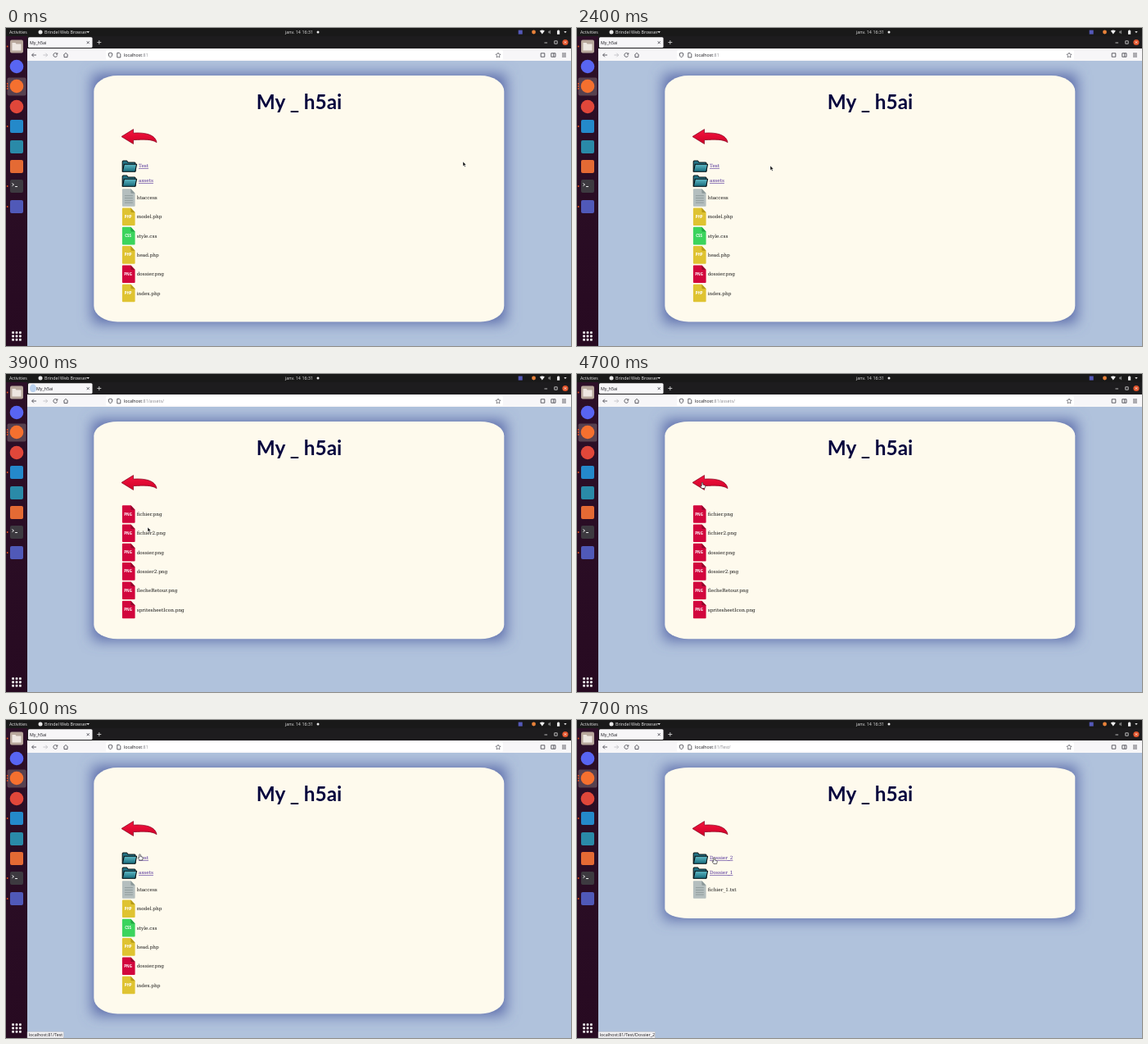
Recreate the animation shown at these times as an HTML page. Size 690x388 px, loop 8 s.

```html
<!DOCTYPE html>
<html lang="fr">
<head>
<meta charset="utf-8">
<title>My_h5ai</title>
<style>
  html, body { margin: 0; width: 100%; height: 100%; overflow: hidden; background: #b0c2dc; }
  svg { display: block; width: 690px; height: 388px; }
  .ui { font: 5.3px "Open Sans", sans-serif; fill: #15141a; }
  .bar { fill: #e8e8e8; }
  .dim { fill: #85858c; }
  .row { font: 5.74px "DejaVu Serif", serif; fill: #111; }
  .link { text-decoration: underline; }
  .tag { font: bold 4.4px "Open Sans", sans-serif; fill: #fff; text-anchor: middle; }
  .line { fill: none; stroke: #3c3b44; stroke-width: .8; }
  .pale { fill: none; stroke: #ddd; stroke-width: .8; }
</style>
</head>
<body>
<svg viewBox="0 0 690 388">
  <defs>
    <filter id="blur" x="-20%" y="-30%" width="140%" height="160%"><feGaussianBlur stdDeviation="8.5"/></filter>
    <linearGradient id="dock" x2="0" y2="1">
      <stop offset="0" stop-color="#2d1028"/><stop offset="1" stop-color="#270a21"/>
    </linearGradient>
    <linearGradient id="teal" x2="0" y2="1">
      <stop offset="0" stop-color="#62bcc8"/><stop offset="1" stop-color="#176b7c"/>
    </linearGradient>
    <linearGradient id="red" x2="0" y2="1">
      <stop offset="0" stop-color="#f5153f"/><stop offset="1" stop-color="#cf0028"/>
    </linearGradient>
    <g id="folder" stroke="#0b1519" stroke-width="1.1" stroke-linejoin="round">
      <path d="M1.2 13.8V2q0-1 1-1H6.5l1.6 2H16q1 0 1 1V13.8Z" fill="#237284"/>
      <path d="M1.3 14.2 3.4 5.2H18.6L16.8 14.2Z" fill="url(#teal)"/>
    </g>
  </defs>

  <rect width="690" height="388" fill="#b0c2dc"/>
  <rect id="shade" x="106" y="57" width="504" fill="#5465a6" filter="url(#blur)"/>
  <rect id="card" x="107.3" y="58" width="501" rx="29" fill="#fefaed"/>
  <text x="358" y="98.5" text-anchor="middle" fill="#05043d" style="font:bold 24.3px Lato,sans-serif">My _ h5ai</text>
  <path d="M141 132.5 155.5 123.6V128.2C171 127.2 182.5 130.5 184 139.6 178 135.6 169 135.8 155.5 136.6V141.4Z" fill="url(#red)" stroke="#8d0a25" stroke-width=".8" stroke-linejoin="round"/>
  <g id="rows"></g>

  <rect x="26" y="10" width="664" height="15" fill="#1d1c1e"/>
  <rect x="26" y="25" width="664" height="15" fill="#f7f6f8"/>
  <rect x="27" y="11.3" width="78.5" height="12.7" rx="1.5" fill="#f7f6f8"/>
  <rect x="122" y="27" width="485" height="11.5" rx="1.5" fill="#fff"/>
  <path class="line" d="M98.7 16.2l3 3m0-3l-3 3"/>
  <path class="pale" d="M113.8 15v5m-2.5-2.5h5"/>
  <path class="pale" d="M657.5 18h3.6M669.8 15.8h3.4v3.4h-3.4Z"/>
  <circle cx="683" cy="17.5" r="3.6" fill="#e2552c"/>
  <path d="M681.7 16.2l2.6 2.6m0-2.6l-2.6 2.6" stroke="#fff" stroke-width=".7"/>

  <path class="line" d="M37 33H31.7M33.9 30.7 31.6 33l2.3 2.3M62.3 31.6A2.4 2.4 0 1 0 62.6 33.6M62.8 30.3v1.8h-1.8M70.3 33 73 30.4 75.7 33M71 32.6v3h4v-3"/>
  <path class="line" style="stroke:#b9b9be" d="M45.4 33h5.2M48.4 30.7 50.7 33l-2.3 2.3"/>
  <path class="line" d="M127.5 30.2l2.3.8q.2 3.8-2.3 5-2.5-1.2-2.3-5ZM135.8 30.3h2.4l1.6 1.6v4h-4Z"/>
  <path class="line" style="stroke-width:.6" d="M601 30l.9 1.9 2.1.3-1.5 1.5.4 2.1-1.9-1-1.9 1 .4-2.1-1.5-1.5 2.1-.3Z"/>
  <path class="line" d="M653.2 30.8h4.6v4.4h-4.6ZM665.8 30.8h5.2v4.4h-5.2ZM668.8 30.8v4.4M679 31h5M679 33h5M679 35h5"/>
  <g id="spin"><ellipse cy="17.5" ry="1.1" id="dot"/></g>
  <text id="title" class="ui" y="19.6">My_h5ai</text>
  <text class="ui" x="144" y="35">localhost<tspan id="path" class="dim"></tspan></text>

  <rect width="690" height="10" fill="#191919"/>
  <text class="ui bar" x="4" y="6.9">Activities</text>
  <circle cx="42" cy="5" r="2.5" fill="#e8e8e8"/>
  <text class="ui bar" x="47" y="6.9">Brindel Web Browser</text>
  <path d="M98.5 4h3.4l-1.7 2.2Z" fill="#ddd"/>
  <text class="ui bar" x="341" y="6.9">janv. 14</text>
  <text class="ui bar" x="361.5" y="6.9">16:31</text>
  <circle cx="381" cy="5" r="1.5" fill="#eee"/>
  <rect x="625.7" y="2.6" width="5" height="5" fill="#5559b9"/>
  <circle cx="644.5" cy="5" r="2.4" fill="#e8823a"/>
  <path d="M651.8 3.6q3-2.4 6 0L654.8 7.5Z" fill="#eee"/>
  <path d="M662.2 3.8h1.3l1.6-1.3v5l-1.6-1.3h-1.3Z" fill="#777"/>
  <path d="M673 3.2h.8v-.8h1.6v.8h.8v4.6H673Z" fill="#eee"/>
  <path d="M681.3 4h3.4L683 6.2Z" fill="#ddd"/>

  <rect y="10" width="26" height="378" fill="url(#dock)"/>
  <rect x="1.5" y="60.5" width="23" height="22" rx="2" fill="#57414f"/>
  <g id="apps"></g>

  <g id="status">
    <path id="tip" fill="#f4f3f5" stroke="#a9adb5" stroke-width=".5"/>
    <text id="hint" class="ui" x="27.6" y="386"></text>
  </g>
  <path id="arrow" d="M0 0V5.6L1.3 4.4 2.3 6.6 3.3 6.1 2.3 4H4Z" fill="#111" stroke="#fff" stroke-width=".45"/>
  <path id="hand" d="M-.8.3Q0-.8.8.3V2.5L3.2 3.2Q3.9 3.5 3.7 4.5L3.1 7H-.6L-2.5 4.2Q-2.3 3.2-.8 4.3Z" fill="#fff" stroke="#111" stroke-width=".6"/>
</svg>
<script>
const $ = id => document.getElementById(id);
const LOOP = 8000, STEP = 100;

const kinds = {
  txt: { fill: '#b4bebe', fold: '#8b9898' },
  php: { fill: '#dfc331', fold: '#b79c17', tag: 'PHP' },
  css: { fill: '#3bd45d', fold: '#22a843', tag: 'CSS' },
  png: { fill: '#d2063d', fold: '#94052c', tag: 'PNG' }
};

function folder(name, i) {
  const y = 161 + i * 18;
  return `<use href="#folder" x="141" y="${y}"/>
    <text class="row link" x="162" y="${y + 9.3}">${name}</text>`;
}

function file(name, y) {
  const kind = kinds[name.split('.')[1]] || kinds.txt;
  const mark = kind.tag
    ? `<text class="tag" x="7.2" y="12.4">${kind.tag}</text>`
    : `<path d="M3 8.5h10M3 11.3h10M3 14.1h10M3 16.9h10" stroke="${kind.fold}" stroke-width=".9"/>`;
  return `<g transform="translate(141.9 ${y})">
    <path d="M1 0H10.5L15.7 5.6V20.6q0 1-1 1H1q-1 0-1-1V1q0-1 1-1Z" fill="${kind.fill}"/>
    <path d="M10.5 0V4.6q0 1 1 1H15.7Z" fill="${kind.fold}"/>${mark}</g>
    <text class="row" x="159.7" y="${y + 12.8}">${name}</text>`;
}

const files = (names, top) => names.map((n, i) => file(n, top + i * 23.3)).join('');
const folders = names => names.map(folder).join('');

const pages = {
  root: {
    path: ':81', bottom: 358.5,
    rows: folders(['Test', 'assets']) +
      files(['htaccess', 'model.php', 'style.css', 'head.php', 'dossier.png', 'index.php'], 196.2)
  },
  assets: {
    path: ':81/assets/', bottom: 323.3,
    rows: files(['fichier.png', 'fichier2.png', 'dossier.png', 'dossier2.png', 'flecheRetour.png', 'spritesheetIcon.png'], 160.2)
  },
  test: {
    path: ':81/Test/', bottom: 242,
    rows: folders(['Dossier_2', 'Dossier_1']) + file('fichier_1.txt', 196.2)
  }
};

// time, x, y of the pointer tip
const route = [
  [1300, 558, 163], [1700, 394, 158], [2100, 394, 158], [2400, 236, 168], [2600, 190, 176],
  [2900, 190, 176], [3300, 173, 187], [4300, 173, 187], [4700, 153, 132.5],
  [5500, 153, 132.5], [6100, 163.5, 164], [6300, 167.5, 168.5]
];

function pointer(t) {
  const i = route.findIndex(p => p[0] > t);
  if (i === 0) return route[0].slice(1);
  if (i < 0) return route[route.length - 1].slice(1);
  const [a, ax, ay] = route[i - 1], [b, bx, by] = route[i];
  const k = (t - a) / (b - a);
  return [ax + (bx - ax) * k, ay + (by - ay) * k];
}

const within = (t, ...spans) => spans.some(([a, b]) => t >= a && t < b);

function buildDock() {
  const round = (y, c) => `<circle cx="13" cy="${y}" r="8.3" fill="${c}"/>`;
  const square = (y, c) => `<rect x="5" y="${y - 8}" width="16" height="16" rx="2" fill="${c}"/>`;
  let s = square(22.5, '#b8a89c') + '<path d="M7.5 18h4l1 1.5h6v8h-11Z" fill="#eee7e1"/>' +
    round(47, '#5865f2') + round(71, '#f5702f') + round(96, '#e0473a') +
    square(120, '#2489ca') + square(145, '#2a8aa8') + square(169, '#e46a34') +
    square(193, '#3d3a40') + '<path d="M7.5 189.5l2 1.6-2 1.6M11 193.5h3" fill="none" stroke="#fff" stroke-width=".9"/>' +
    square(218, '#5059b8');
  for (const y of [22.5, 68, 71, 74, 120, 193, 218]) s += `<circle cx="1.7" cy="${y}" r=".9" fill="#e95420"/>`;
  for (let i = 0; i < 9; i++)
    s += `<rect x="${7.2 + i % 3 * 4.4}" y="${370.2 + Math.floor(i / 3) * 4.4}" width="2.8" height="2.8" rx=".8" fill="#f2f2f2"/>`;
  $('apps').innerHTML = s;
}

let shown;
function showPage(name) {
  if (name === shown) return;
  shown = name;
  const page = pages[name], h = page.bottom - 58;
  $('rows').innerHTML = page.rows;
  $('path').textContent = page.path;
  $('card').setAttribute('height', h);
  $('card').setAttribute('ry', h * .065);
  $('shade').setAttribute('height', h + 2);
}

function linkColours(t) {
  const base = within(t, [5400, 6000]) ? '#2a16d8' : '#4c2a96';
  const pressed = within(t, [3500, 3700]) ? 'assets' : within(t, [7100, 7300]) ? 'Test' : '';
  for (const el of document.querySelectorAll('.link'))
    el.style.fill = el.textContent === pressed ? '#e00000' : base;
}

function showTab(t) {
  const wait = within(t, [3700, 3800], [5300, 5400], [7300, 7400]);
  const burst = within(t, [3800, 4000], [5400, 5600], [7400, 7600]);
  $('spin').style.display = wait || burst ? '' : 'none';
  $('dot').setAttribute('cx', wait ? 31 : 33);
  $('dot').setAttribute('rx', wait ? 1.1 : 4);
  $('dot').setAttribute('ry', wait ? 1.1 : 5);
  $('dot').setAttribute('fill', wait ? '#55555c' : '#bcd2ee');
  $('title').setAttribute('x', wait || burst ? 37 : 29);
}

function showStatus(t) {
  const [hint, w] = within(t, [3200, 3800]) ? ['assets', 49]
    : within(t, [6100, 7500]) ? ['Test', 44.5]
    : t >= 7500 ? ['Test/Dossier_2', 69.5] : ['', 0];
  $('status').style.display = hint ? '' : 'none';
  $('hint').textContent = 'localhost:81/' + hint;
  $('tip').setAttribute('d', `M26 380.3h${w - 1}q1 0 1 1V388H26Z`);
}

function showPointer(t) {
  const [x, y] = pointer(t);
  const hand = within(t, [3200, 3700], [4600, 5600], [6100, 7300], [7500, LOOP]);
  $('hand').style.display = hand ? '' : 'none';
  $('arrow').style.display = hand ? 'none' : '';
  for (const id of ['hand', 'arrow']) $(id).setAttribute('transform', `translate(${x} ${y})`);
}

function draw(t) {
  showPage(within(t, [3800, 5400]) ? 'assets' : t >= 7400 ? 'test' : 'root');
  linkColours(t);
  showTab(t);
  showStatus(t);
  showPointer(t);
}

buildDock();
const start = performance.now();
function tick() {
  const t = (performance.now() - start) % LOOP;
  draw(Math.floor(t / STEP) * STEP);
  requestAnimationFrame(tick);
}
tick();
</script>
</body>
</html>
```
